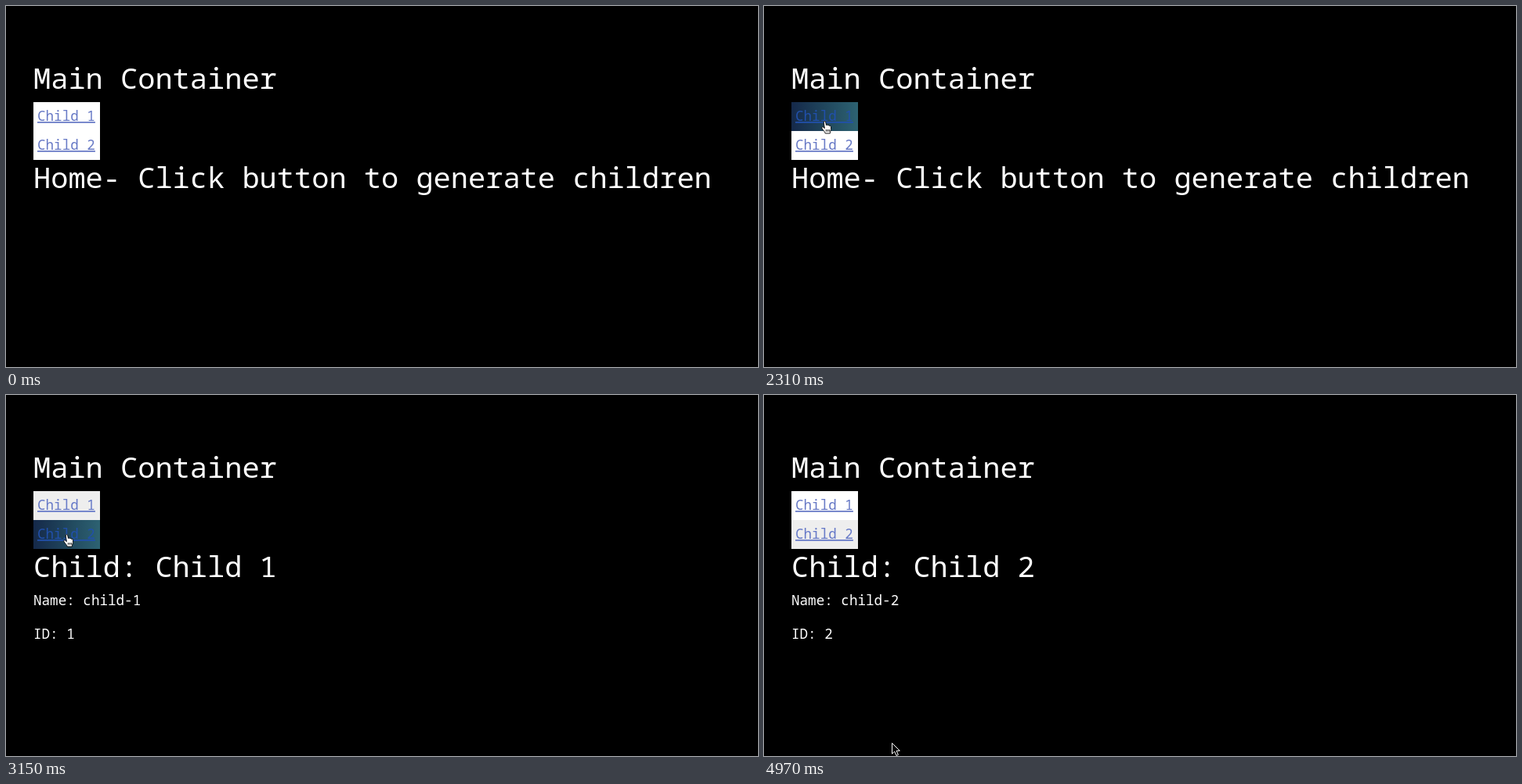
Recreate the animation shown at these times as an HTML page. Size 960 px wide and 462 px high, loop 5040 ms.

```html
<!DOCTYPE html>
<html lang="en">
<head>
<meta charset="utf-8">
<title>Main Container</title>
<style>
  html, body { margin: 0; width: 100%; height: 100%; overflow: hidden; background: #000; }
  svg { display: block; width: 100%; height: 100%; }
  text { font-family: "Noto Sans Mono", "DejaVu Sans Mono", monospace; fill: #fff; white-space: pre; }
  .title { font-size: 37px; }
  .small { font-size: 17.6px; font-weight: 500; }
  .link { font-size: 17.6px; text-decoration: underline 1px; text-underline-offset: 2px; text-decoration-skip-ink: none; }
</style>
</head>
<body>
<svg viewBox="0 0 960 462">
  <defs>
    <linearGradient id="glow">
      <stop offset="0" stop-color="#15294a"/>
      <stop offset=".5" stop-color="#20465c"/>
      <stop offset="1" stop-color="#2d6272"/>
    </linearGradient>
  </defs>
  <rect width="960" height="462" fill="#000"/>
  <text class="title" x="35" y="106">Main Container</text>
  <g class="item">
    <rect x="35" y="123" width="85" height="37"/>
    <text class="link" x="40" y="147">Child 1</text>
  </g>
  <g class="item">
    <rect x="35" y="160" width="85" height="37"/>
    <text class="link" x="40" y="184">Child 2</text>
  </g>
  <text id="heading" class="title" x="35" y="233"></text>
  <text id="name" class="small" x="35" y="269"></text>
  <text id="ident" class="small" x="35" y="312"></text>
  <g id="cursor">
    <path id="arrow" d="M.5 .5V14.2L3.7 11.2L6 16.5L8.4 15.4L6.1 10.3H10.3Z" fill="#000" stroke="#fff" stroke-linejoin="round"/>
    <path id="hand" d="M3.2 2C3.2 .2 5.4 .2 5.7 1.8L6.5 5.6C7 4.7 8.3 4.9 8.6 5.8C9.2 5.2 10.4 5.5 10.6 6.4C11.3 5.9 12.5 6.5 12.5 7.7V10.5C12.4 12.5 11.4 13.2 11.3 16H5.2C4.8 13.6 2.2 12 .9 9.4C.3 8 1.8 7.2 2.9 8.3L4.4 9.6ZM6.4 11V13.7M8.4 11V13.7M10.3 11V13.7" fill="#fff" stroke="#000" stroke-width=".9" stroke-linejoin="round"/>
  </g>
</svg>
<script>
const LOOP = 5040, STEP = 70, FADE = 400;
const $ = id => document.getElementById(id);
const items = [...document.querySelectorAll('.item')].map(g => ({ box: g.children[0], link: g.children[1] }));

// Pointer path: time, x, y
const path = [
  [70, 163, 428], [140, 150, 385], [210, 132, 330], [280, 114, 280], [350, 104, 254],
  [490, 103, 250], [700, 99, 215], [980, 96, 160], [1260, 72, 134],
  [1680, 72, 134], [1890, 73, 147], [2660, 73, 147], [2940, 73, 171],
  [3150, 73, 178], [4620, 73, 178], [4690, 81, 222], [4760, 94, 312],
  [4830, 113, 388], [4900, 139, 425], [4970, 163, 445]
];
const hovers = [[1820, 2875], [2875, 4695]];
const pages = [[0, 0], [2380, 1], [4060, 2]];

const mix = (a, b, k) => a + (b - a) * k;
const mixColor = (a, b, k) => `rgb(${a.map((v, i) => Math.round(mix(v, b[i], k)))})`;

// CSS "ease": cubic-bezier(.25, .1, .25, 1)
function ease(x) {
  if (x <= 0) return 0;
  if (x >= 1) return 1;
  const curve = (a, b, u) => 3 * a * u * (1 - u) ** 2 + 3 * b * u * u * (1 - u) + u ** 3;
  let lo = 0, hi = 1;
  for (let i = 0; i < 20; i++) {
    const mid = (lo + hi) / 2;
    if (curve(.25, .25, mid) < x) lo = mid; else hi = mid;
  }
  return curve(.1, 1, lo);
}

function pointAt(t) {
  const i = path.findIndex(p => p[0] > t);
  if (i < 0) return path[path.length - 1].slice(1);
  const [t0, x0, y0] = path[i - 1], [t1, x1, y1] = path[i];
  const k = (t - t0) / (t1 - t0);
  return [mix(x0, x1, k), mix(y0, y1, k)];
}

function paintItem({ box, link }, [from, to], t) {
  if (t >= from && t < to) {
    box.setAttribute('fill', 'url(#glow)');
    link.style.fill = '#2150ab';
    return;
  }
  const k = t < from ? 1 : ease((t - to) / FADE);
  box.setAttribute('fill', mixColor([0, 0, 0], [255, 255, 255], k));
  link.style.fill = mixColor([96, 126, 236], [104, 122, 198], k);
}

function paintPage(t) {
  const id = pages.filter(p => p[0] <= t).pop()[1];
  $('heading').textContent = id ? `Child: Child ${id}` : 'Home- Click button to generate children';
  $('name').textContent = id ? `Name: child-${id}` : '';
  $('ident').textContent = id ? `ID: ${id}` : '';
}

function paintCursor(t) {
  const shown = t >= path[0][0];
  $('cursor').style.display = shown ? '' : 'none';
  if (!shown) return;
  const [x, y] = pointAt(t);
  const pointing = t >= 1750 && t < 4690;
  $('cursor').setAttribute('transform', `translate(${Math.round(x)} ${Math.round(y)})`);
  $('arrow').style.display = pointing ? 'none' : '';
  $('hand').style.display = pointing ? '' : 'none';
}

function draw(t) {
  items.forEach((item, i) => paintItem(item, hovers[i], t));
  paintPage(t);
  paintCursor(t);
}

const start = performance.now();
function tick() {
  const t = (performance.now() - start) % LOOP;
  draw(Math.floor(t / STEP) * STEP);
  requestAnimationFrame(tick);
}
tick();
</script>
</body>
</html>
```
